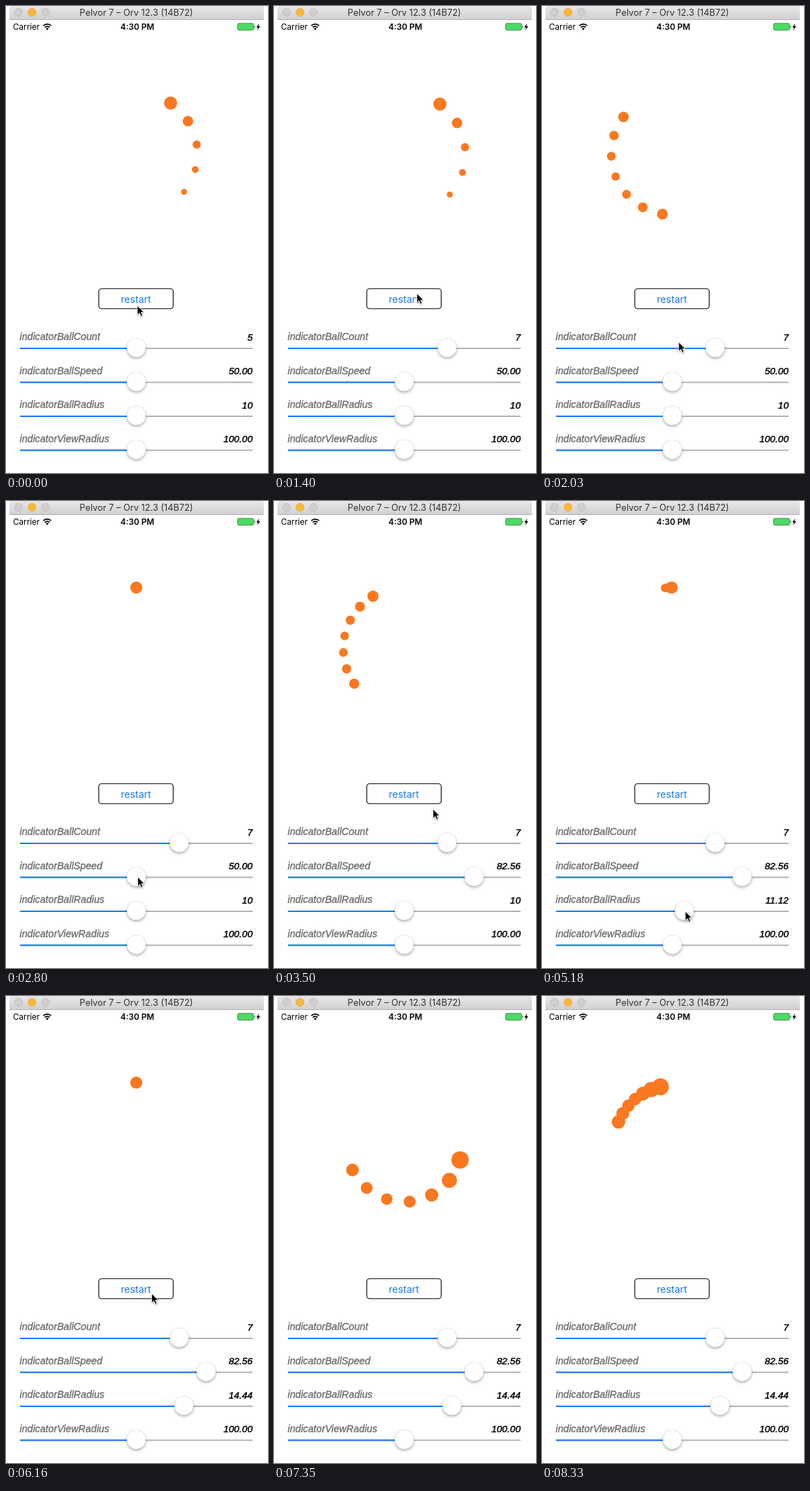
An HTML page that plays this animation: 375 by 667 pixels, repeating every 8.4 s.

```html
<!DOCTYPE html>
<html lang="en">
<head>
<meta charset="utf-8">
<title>Ball indicator demo</title>
<style>
  html, body { margin: 0; width: 100%; height: 100%; overflow: hidden; background: #fff; }
  svg { display: block; width: 375px; height: 667px; }
  text { font-family: Inter, Roboto, sans-serif; }
  .name, .value { font: italic 14.2px "Liberation Sans", Arial, sans-serif; }
  .name { fill: #6c6c6c; stroke: #6c6c6c; stroke-width: .35; }
  .value { font-size: 13.7px; fill: #000; stroke: #000; stroke-width: .45; text-anchor: end; }
  .thumb { fill: #fff; filter: drop-shadow(0 2px 2px rgba(0, 0, 0, .26)) drop-shadow(0 0 .5px rgba(0, 0, 0, .3)); }
  #cursor { filter: drop-shadow(0 1px 1px rgba(0, 0, 0, .35)); }
</style>
</head>
<body>
<svg viewBox="0 0 375 667">
  <defs>
    <linearGradient id="bar" x2="0" y2="1">
      <stop stop-color="#e9e7e9"/>
      <stop offset="1" stop-color="#d0ced0"/>
    </linearGradient>
  </defs>

  <!-- window bar -->
  <path d="M5 20V3q0-3 3-3H366q3 0 3 3V20z" fill="url(#bar)"/>
  <path d="M5 19.5H369" stroke="#b5b3b5"/>
  <g stroke-width=".8">
    <circle cx="18" cy="9" r="5.6" fill="#d0ced0" stroke="#bab8ba"/>
    <circle cx="37.2" cy="9" r="5.6" fill="#fdb935" stroke="#e2a02c"/>
    <circle cx="56.5" cy="9" r="5.6" fill="#d0ced0" stroke="#bab8ba"/>
  </g>
  <text x="186.5" y="14" font-size="12.8" text-anchor="middle" fill="#333">Pelvor 7 – Orv 12.3 (14B72)</text>

  <!-- status bar -->
  <text x="10" y="34" font-size="11.7">Carrier</text>
  <g fill="none" stroke="#000" stroke-width="1.7">
    <path d="M53.4 28.2a7.8 7.8 0 0 1 11.2 0"/>
    <path d="M55.5 30.6a4.9 4.9 0 0 1 7 0"/>
  </g>
  <path d="M59 34.4l-2-2.2a2.8 2.8 0 0 1 4 0z"/>
  <text x="188" y="34" font-size="11.8" font-weight="600" text-anchor="middle">4:30 PM</text>
  <rect x="331.5" y="24.8" width="23" height="9.7" rx="1.8" fill="#4cd964" stroke="#4a8a52" stroke-width=".9"/>
  <path d="M355.5 28v3.6q1.4-.5 1.4-1.8t-1.4-1.8z" fill="#35863f"/>
  <path d="M362.3 25l-4.1 5.4h2.5l-1.3 4.4 4.5-5.7h-2.6z"/>

  <g id="balls" fill="#fa7820"></g>

  <rect x="132.8" y="403.8" width="106.5" height="28.5" rx="4" fill="#fff" stroke="#000" stroke-width="1.1"/>
  <text x="186" y="423.5" font-size="14.1" text-anchor="middle" fill="#1878ee">restart</text>

  <g id="sliders"></g>
  <path id="cursor" d="M0 0V13.2L3.1 10.4 5.2 15.2 7.5 14.2 5.4 9.6H9.5z" stroke="#fff" stroke-width=".9"/>
</svg>

<script>
const LOOP = 8400, STEP = 70;
const CENTER = { x: 186.5, y: 211 }, POINT = 0.971;

const $ = id => document.getElementById(id);
const add = (parent, tag, attrs, text = '') => {
  const el = document.createElementNS('http://www.w3.org/2000/svg', tag);
  set(el, attrs);
  el.textContent = text;
  return parent.appendChild(el);
};
const set = (el, attrs) => { for (const key in attrs) el.setAttribute(key, attrs[key]); };
const mix = (a, b, p) => a + (b - a) * p;
const smooth = (t, from, to) => {
  const p = Math.min(1, Math.max(0, (t - from) / (to - from)));
  return p * p * (3 - 2 * p);
};

// Each press of restart applies the slider values to a new run.
const runs = [
  { start: -253.7, period: 1394, count: 5, radius: 10 },
  { start: 1470, period: 1394, count: 7, radius: 10 },
  { start: 3639, period: 843, count: 7, radius: 10 },
  { start: 6317, period: 788, count: 7, radius: 14.44 }
];

const sliders = [
  { name: 'indicatorBallCount', y: 488, max: 10, value: 5, end: 7, drag: [350, 850], label: v => Math.round(v) },
  { name: 'indicatorBallSpeed', y: 536.5, max: 100, value: 50, end: 82.56, drag: [2800, 3220], label: v => v.toFixed(2) },
  { name: 'indicatorBallRadius', y: 585, max: 20, value: 10, end: 14.44, drag: [5000, 5550], label: v => v === 10 ? '10' : v.toFixed(2) },
  { name: 'indicatorViewRadius', y: 633.5, max: 200, value: 100, end: 100, drag: [0, 1], label: v => v.toFixed(2) }
];

// time, x, y of the pointer tip
const path = [
  [0, 188, 428], [350, 188, 490], [850, 249.5, 490], [1400, 204.5, 410.5],
  [1550, 204.5, 410.5], [2450, 188.5, 537], [2800, 188.5, 537], [3220, 288.5, 537],
  [3600, 215, 420], [3700, 215, 420], [4200, 220.5, 622.5], [4400, 215, 650],
  [4800, 188, 586], [5000, 188, 586], [5550, 256, 586], [6000, 208.5, 425],
  [6400, 208.5, 425], [7000, 208, -20], [LOOP, 208, -20]
];

const balls = Array.from({ length: 7 }, () => add($('balls'), 'circle', {}));

for (const s of sliders) {
  const row = $('sliders'), y = s.y + 1;
  add(row, 'text', { class: 'name', x: 19.5, y: s.y - 11 }, s.name);
  s.text = add(row, 'text', { class: 'value', x: 353, y: s.y - 10.2 });
  add(row, 'path', { d: `M20 ${y}H353`, stroke: '#b4b4b4', 'stroke-width': 2 });
  s.fill = add(row, 'path', { stroke: '#187bf7', 'stroke-width': 2 });
  s.thumb = add(row, 'circle', { class: 'thumb', cy: s.y, r: 13.5 });
}

const bezier = (u, a, b) => 3 * (1 - u) ** 2 * u * a + 3 * (1 - u) * u * u * b + u ** 3;

// cubic-bezier(.5, .1 + rate, .25, 1): finds the curve parameter for a phase
function curveAt(phase) {
  let low = 0, high = 1;
  for (let i = 0; i < 30; i++) {
    const mid = (low + high) / 2;
    if (bezier(mid, 0.5, 0.25) < phase) low = mid; else high = mid;
  }
  return low;
}

function drawBalls(t) {
  const run = runs.findLast(r => r.start <= t);
  const u = curveAt((t - run.start) / run.period % 1);
  const orbit = (100 - run.radius) * POINT;
  balls.forEach((ball, i) => {
    const rate = i / run.count;
    const p = bezier(u, 0.1 + rate, 1);
    const angle = p * 2 * Math.PI;
    const last = Math.max(0.62, 0.4 + 0.57 * rate);
    set(ball, {
      cx: CENTER.x + orbit * Math.sin(angle),
      cy: CENTER.y - orbit * Math.cos(angle),
      r: i < run.count ? run.radius * POINT * mix(1 - rate, last, p) : 0
    });
  });
}

function drawSliders(t) {
  for (const s of sliders) {
    const value = mix(s.value, s.end, smooth(t, ...s.drag));
    const x = 33 + 307 * value / s.max;
    s.text.textContent = s.label(value);
    set(s.fill, { d: `M20 ${s.y + 1}H${x}` });
    set(s.thumb, { cx: x });
  }
}

function drawCursor(t) {
  const i = path.findIndex(k => k[0] > t);
  const [a, b] = [path[i - 1], path[i]];
  const p = smooth(t, a[0], b[0]);
  set($('cursor'), { transform: `translate(${mix(a[1], b[1], p)} ${mix(a[2], b[2], p)})` });
}

const begin = performance.now();
function frame() {
  const now = Math.max(0, performance.now() - begin) % LOOP;
  const t = Math.floor(now / STEP) * STEP;
  drawBalls(t);
  drawSliders(t);
  drawCursor(t);
  requestAnimationFrame(frame);
}
frame();
</script>
</body>
</html>
```
